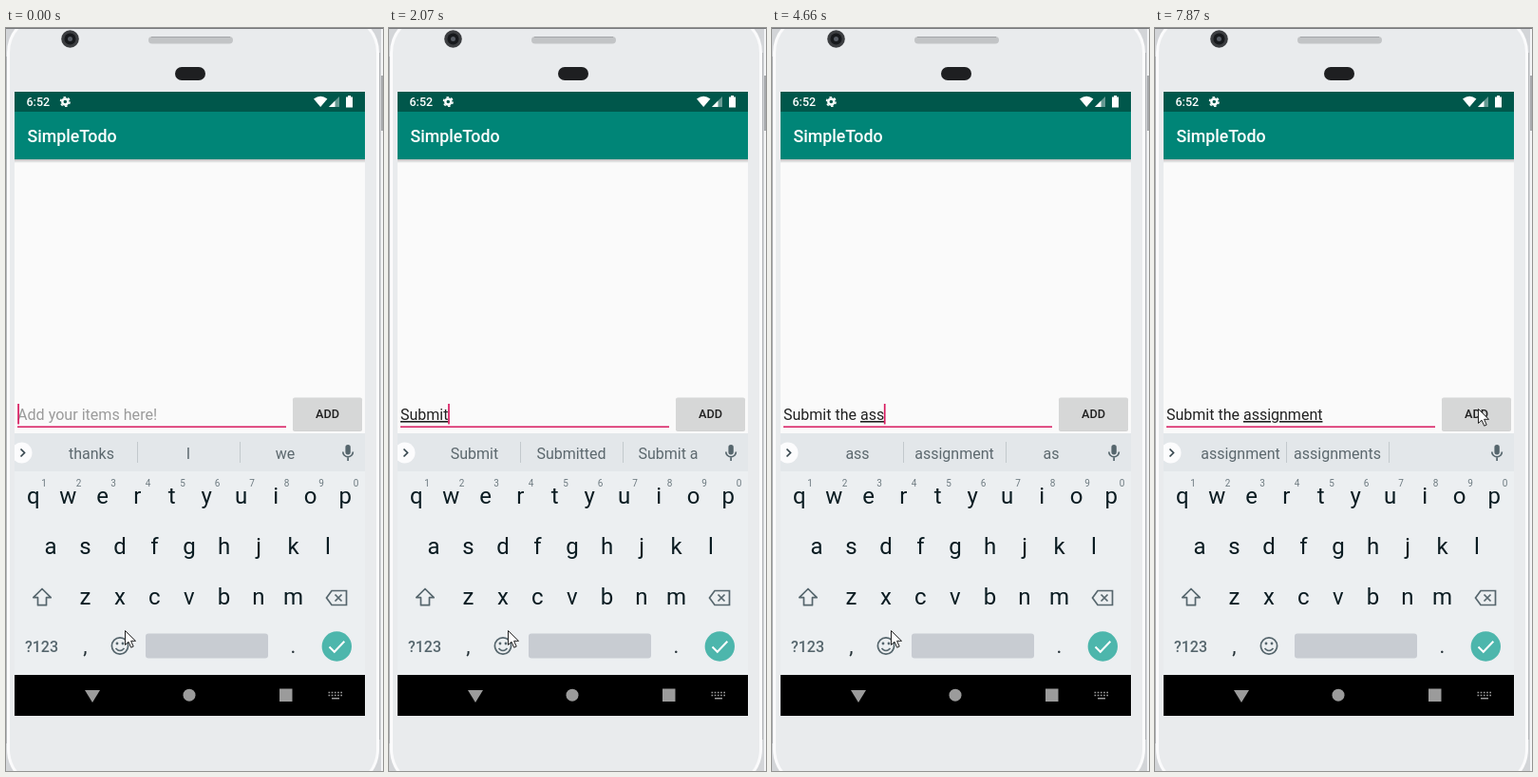
These frames come from a looping animation (397 by 781 pixels, 7.99 s). An HTML page:

```html
<!DOCTYPE html>
<html lang="en">
<head>
<meta charset="utf-8">
<title>SimpleTodo</title>
<style>
html, body { margin: 0; height: 100%; overflow: hidden; background: #e9ebed; }
svg { display: block; width: 397px; height: 781px; font-family: Roboto, sans-serif; }
text { white-space: pre; }
.mid { text-anchor: middle; }
.medium { font-weight: 500; }
.line { fill: none; stroke: #56666d; stroke-width: 1.7; }
#word { text-decoration: underline; text-decoration-thickness: 1px; text-decoration-skip-ink: none; }
</style>
</head>
<body>
<svg viewBox="0 0 397 781">
  <defs>
    <linearGradient id="shade" x2="0" y2="1">
      <stop stop-color="#000" stop-opacity=".25"/>
      <stop offset="1" stop-color="#000" stop-opacity="0"/>
    </linearGradient>
    <clipPath id="screen"><path d="M9 67H378V723H9z"/></clipPath>
  </defs>

  <!-- phone body -->
  <path fill="#d3d5d8" d="M0 0H397V781H0z"/>
  <rect x="2.5" y="-14" width="389" height="812" rx="40" fill="#e9ebed" stroke="#fbfbfc" stroke-width="3"/>
  <path stroke="#b4b6b9" fill="none" d="M.5 30V752M393.5 26V748"/>
  <path fill="#f4f5f6" d="M395 0h2V781h-2z"/>
  <path fill="#a8aaad" d="M395 50h2v58h-2z"/>
  <path fill="#77797c" d="M0 0H397V1H0z"/>
  <circle cx="67.500" cy="11.500" r="9.300" fill="#3b3d40"/>
  <circle cx="67.500" cy="11.500" r="6" fill="#17191c"/>
  <circle cx="67.500" cy="11.500" r="2.500" fill="#565b63"/>
  <rect x="150" y="9" width="89" height="7.500" rx="3.700" fill="#c2c4c6"/>
  <path stroke="#a4a6a9" d="M153 9.500H236"/>
  <rect x="178" y="41" width="32" height="14" rx="7" fill="#1e1f21"/>

  <!-- app -->
  <g clip-path="url(#screen)">
    <path fill="#fafafa" d="M9 67H378V723H9z"/>
    <path fill="#00574b" d="M9 67H378V88H9z"/>
    <path fill="#008577" d="M9 88H378V138H9z"/>
    <path fill="url(#shade)" d="M9 138H378V142H9z"/>
    <g fill="#fff">
      <text class="medium" x="21.500" y="82" font-size="12.500">6:52</text>
      <text class="medium" x="22.500" y="120" font-size="17.800">SimpleTodo</text>
      <circle cx="62.300" cy="77.500" r="3" fill="none" stroke="#fff" stroke-width="2.400"/>
      <circle cx="62.300" cy="77.500" r="4.800" fill="none" stroke="#fff" stroke-width="1.500" stroke-dasharray="2.500 2.527"/>
      <path d="M324 74.500q7.200-5.500 14.400 0L331.200 83z"/>
      <path d="M351 72V83H340z" opacity=".4"/>
      <path d="M346.500 76.500V83H340z"/>
      <path d="M358 72.500h2v-1.500h3v1.500h2V83.500h-7z"/>
    </g>

    <text id="hint" x="12" y="412" font-size="16.100" fill="#9b9b9b">Add your items here!</text>
    <text id="field" x="12" y="412" font-size="16" fill="#212121"><tspan id="done"></tspan><tspan id="word"></tspan></text>
    <path fill="#d81b60" d="M12 418.500H295V420H12z"/>
    <rect id="caret" y="395" width="1.700" height="21.500" fill="#d81b60"/>
    <rect x="302" y="389.500" width="73" height="34.500" rx="2" fill="#000" opacity=".16"/>
    <rect x="302" y="388.500" width="73" height="34.500" rx="2" fill="#d6d7d7"/>
    <text class="mid medium" x="338.500" y="410" font-size="12.700" fill="#212121">ADD</text>

    <!-- keyboard -->
    <path fill="#eceff1" d="M9 426H378V680H9z"/>
    <path fill="#e3e7ea" d="M9 426H378V466H9z"/>
    <circle cx="16.500" cy="446.500" r="11" fill="#fcfcfd"/>
    <path d="M15.500 442.500l4 4-4 4" fill="none" stroke="#37474f" stroke-width="1.700"/>
    <path stroke="#c3c9cd" d="M138.500 435V457M246.500 435V457"/>
    <g id="tips" class="mid" fill="#5c686e"></g>
    <rect x="357.400" y="438" width="5.400" height="10.500" rx="2.700" fill="#56666d"/>
    <path class="line" d="M354.800 445.500a5.300 5.300 0 0 0 10.600 0M360.100 451v4"/>

    <g id="keys" class="mid" font-size="24" fill="#0b1c22"></g>
    <g id="digits" class="mid" font-size="10" fill="#6d7a80"></g>
    <path id="shift" class="line" stroke-linejoin="round" d="M38 589.500l-9.200 9.200h4.700v8h9v-8h4.700z"/>
    <path class="line" d="M343 591.500h15.500v15H343l-5.500-7.500zM346.500 595.500l7 7M353.500 595.500l-7 7"/>
    <text class="mid medium" x="37.500" y="655.500" font-size="16" fill="#56666d">?123</text>
    <g class="mid" font-size="22" fill="#263238">
      <text x="83.500" y="657">,</text><text x="302.500" y="657">.</text>
    </g>
    <circle class="line" cx="120" cy="649.500" r="8.600"/>
    <path class="line" d="M115.500 652q4.500 5 9 0"/>
    <circle cx="117" cy="647" r="1.400" fill="#56666d"/>
    <circle cx="123" cy="647" r="1.400" fill="#56666d"/>
    <rect x="147" y="636.500" width="129" height="26" rx="3" fill="#c8ccd2"/>
    <circle cx="348.300" cy="650" r="15.700" fill="#4db6ac"/>
    <path d="M340.500 650.500l5.300 5.300 10.500-11" fill="none" stroke="#fff" stroke-width="2"/>

    <!-- navigation bar -->
    <path d="M9 680H378V723H9z"/>
    <g fill="#9b9b9b">
      <path d="M83 696H99L91 709z"/>
      <circle cx="193" cy="701.200" r="6.500"/>
      <path d="M288 694.500h13.500v13.500H288z"/>
    </g>
    <path stroke="#9b9b9b" stroke-width="1.600" stroke-dasharray="1.700 1.500" d="M339.500 698.500h15M339.500 701.500h15"/>
    <path stroke="#9b9b9b" stroke-width="1.500" d="M343 704.700h8"/>
  </g>
  <path id="mouse" d="M.5.500V15.500l3.500-3.300 2.700 6 2.500-1.100-2.600-5.800H11.500z" fill="#fff" stroke="#222"/>
</svg>
<script>
const LOOP = 7990;
const $ = id => document.getElementById(id);

// time, finished text, word being typed, three suggestions
const steps = `0|||thanks|I|we
150|||Thanks|I|We
280||S|S|So|Sorry
420||Su|Su|Sure|Sunday
1380||Sub|Su|Sure|Sunday
1500||Sub|Sub|Submit|Submitted
1650||Subm|Subm|Submit|Submitted
1780||Submi|Submi|Submit|Submitted
2050||Submit|Submit|Submitted|Submit a
2320|Submit ||the|a|to
2600|Submit |t|t|the|to
2740|Submit |the|the|they|then
2870|Submit the ||same|application|form
3150|Submit the |a|a|application|assignment
3430|Submit the |as|as|assignment|a
3550|Submit the |ass|ass|assignment|as
5330|Submit the |assi|assi|assignment|assist
5470|Submit the |assig|assig|assignment|assign
5620|Submit the |assign|assign|assignment|assigned
5760|Submit the |assignm|assign|assignment|assigned
5910|Submit the |assignm|assignm|assignment|assignments
6040|Submit the |assignmen|assignmen|assignment|assignments
6190|Submit the |assignment|assignment|assignments|`
  .split("\n").map(row => row.split("|"));

const blinks = [[980, 1380], [4110, 4660], [5060, 5330], [6780, 7330], [7870, LOOP]];

// time, x, y of the pointer tip
const moves = [[0, 125, 633], [7050, 132, 622], [7190, 180, 570], [7330, 258, 482],
  [7460, 328, 408], [7600, 359, 384], [7740, 348, 394], [7870, 340, 400]];

const latest = (list, t) => list.filter(item => item[0] <= t).pop();

function addText(parent, x, y, str) {
  const el = document.createElementNS("http://www.w3.org/2000/svg", "text");
  el.setAttribute("x", x);
  el.setAttribute("y", y);
  el.textContent = str;
  return $(parent).appendChild(el);
}

const keys = [];
[["qwertyuiop", 28.7], ["asdfghjkl", 47], ["zxcvbnm", 83.4]].forEach(([row, x0], r) =>
  [...row].forEach((key, i) => keys.push(addText("keys", x0 + i * 36.5, 500 + r * 53, key))));
[..."1234567890"].forEach((d, i) => addText("digits", 40 + i * 36.5, 482, d));
const tips = [90, 192, 294].map(x => addText("tips", x, 452.5, ""));

let shown;
function showStep(step) {
  if (step === shown) return;
  shown = step;
  const [time, done, word, ...words] = step;
  const caps = time === "150";
  $("done").textContent = done;
  $("word").textContent = word;
  $("hint").style.display = done + word ? "none" : "";
  $("shift").style.fill = caps ? "#56666d" : "none";
  for (const key of keys)
    key.textContent = caps ? key.textContent.toUpperCase() : key.textContent.toLowerCase();
  tips.forEach((tip, i) => {
    tip.textContent = words[i];
    // the outer right slot is narrower, so long words shrink
    tip.setAttribute("font-size", i === 2 && words[i].length > 10 ? 14.3 : 16);
  });
}

function draw(now) {
  const t = now % LOOP;
  showStep(latest(steps, t));
  const width = shown[1] + shown[2] ? $("field").getComputedTextLength() : 0.5;
  $("caret").setAttribute("x", 11.7 + width);
  $("caret").style.display = blinks.some(([a, b]) => t >= a && t < b) ? "none" : "";
  const [, x, y] = latest(moves, t);
  $("mouse").setAttribute("transform", `translate(${x} ${y})`);
  requestAnimationFrame(draw);
}
requestAnimationFrame(draw);
</script>
</body>
</html>
```
